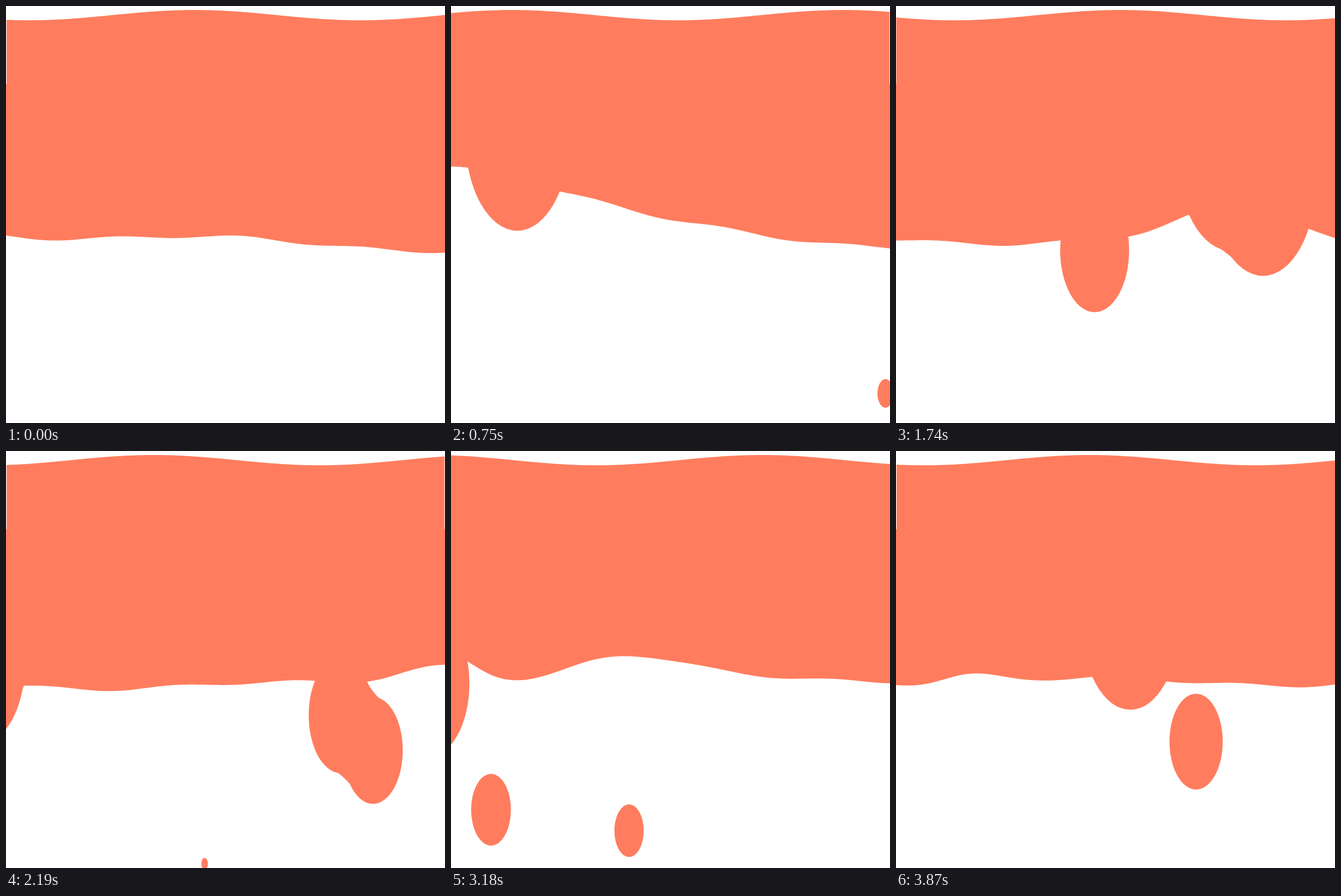
Animation, 768 px wide and 730 px high, one loop 3.9 s. Source, as an HTML page:

```html
<!DOCTYPE html>
<html lang="en">
<head>
<meta charset="utf-8">
<title>Dripping wave</title>
<style>
  html, body { margin: 0; width: 100%; height: 100%; overflow: hidden; background: #fff; }
  svg { display: block; width: 768px; height: 730px; fill: #ff7d5e; }
</style>
</head>
<body>
<svg viewBox="0 0 768 730">
  <defs>
    <filter id="goo" filterUnits="userSpaceOnUse" x="-260" y="-320" width="1300" height="1200" color-interpolation-filters="sRGB">
      <feGaussianBlur stdDeviation="23"/>
      <feColorMatrix values="1 0 0 0 0  0 1 0 0 0  0 0 1 0 0  0 0 0 40 -20" result="goo"/>
      <feMerge><feMergeNode in="goo"/><feMergeNode in="SourceGraphic"/></feMerge>
    </filter>
    <clipPath id="below"><rect y="137" width="768" height="593"/></clipPath>
  </defs>
  <path id="body"/>
  <g clip-path="url(#below)"><g id="drops" filter="url(#goo)"></g></g>
</svg>
<script>
const LOOP = 3900, STEP = 30, W = 768, SHOULDER = 137;
const body = document.getElementById('body');
const layer = document.getElementById('drops');

const cosWave = (x, length) => Math.cos(2 * Math.PI * x / length);

// Places where the lower edge is drawn up for a while, then sinks back
const lifts = [
  { time: 750, life: 438, x: 0, speed: 0, height: 125, width: 235 },
  { time: 1740, life: 600, x: 602, speed: .41, height: 60, width: 90 },
  { time: 3180, life: 300, x: 305, speed: .41, height: 35, width: 85 },
  { time: 3180, life: 690, x: -15, speed: .2, height: 45, width: 50 },
  { time: 3400, life: 500, x: W / 2, speed: 0, height: 16, width: 1000 }
];

// Drops: x, start time, initial radius, gravity (optional)
const drops = [
  [116, -515, 133.5], [760, -1191, 139.4, .00036], [347.5, 240, 139.4, .00038],
  [586, 395, 142], [642, 279, 149], [-45, 580, 147],
  [70, 1088, 151], [311.5, 1028, 148.6], [-39, 1496, 146.5],
  [525, 1987, 140.7], [410, 2424, 140.5]
].map(([x, start, size, g = .000287]) => {
  const el = document.createElementNS('http://www.w3.org/2000/svg', 'ellipse');
  el.setAttribute('cx', x);
  layer.append(el);
  return { el, start, size, g };
});

const waveTop = (x, t) => 16 - 9 * cosWave(x - 330 + 1160 * t / LOOP, 580);

function edge(x, t) {
  const drift = 60 + 110 * Math.sin(Math.PI * t / 3600);
  const tilt = (x - W / 2) * .034 * Math.exp(-t / 900);
  let y = 411 + tilt + 7 * cosWave(x - drift, 640) + 3 * cosWave(x - drift - 20, 220);
  for (const l of lifts) {
    const dt = t - l.time;
    const dx = x - l.x - l.speed * dt;
    y -= l.height * Math.exp(-((dt / l.life) ** 4) - (dx / l.width) ** 2 / 2);
  }
  return y;
}

function drawBody(t) {
  // The wave also sways slightly sideways, which bares the stage sides
  const sway = x => x + (waveTop(x, t) - 16) * .13;
  const left = Math.max(0, sway(0)), right = Math.min(W, sway(W));
  const pts = [[0, SHOULDER], [left, SHOULDER], [left, waveTop(left, t)]];
  for (let x = 4; x < W; x += 4) pts.push([x, waveTop(x, t)]);
  pts.push([right, waveTop(right, t)], [right, SHOULDER], [W, SHOULDER]);
  for (let x = W; x >= 0; x -= 4) pts.push([x, edge(x, t)]);
  body.setAttribute('d', 'M' + pts.map(p => p.map(n => n.toFixed(2))).join('L') + 'Z');
}

function drawDrops(t) {
  for (const { el, start, size, g } of drops) {
    const y = g * (t - start) ** 2 / 2;
    const r = t < start ? 0 : Math.max(0, size - .185 * y);
    el.setAttribute('cy', y);
    el.setAttribute('rx', r);
    el.setAttribute('ry', r * 1.8);
  }
}

function frame() {
  const t = Math.floor(performance.now() % LOOP / STEP) * STEP;
  drawBody(t);
  drawDrops(t);
  requestAnimationFrame(frame);
}
frame();
</script>
</body>
</html>
```
